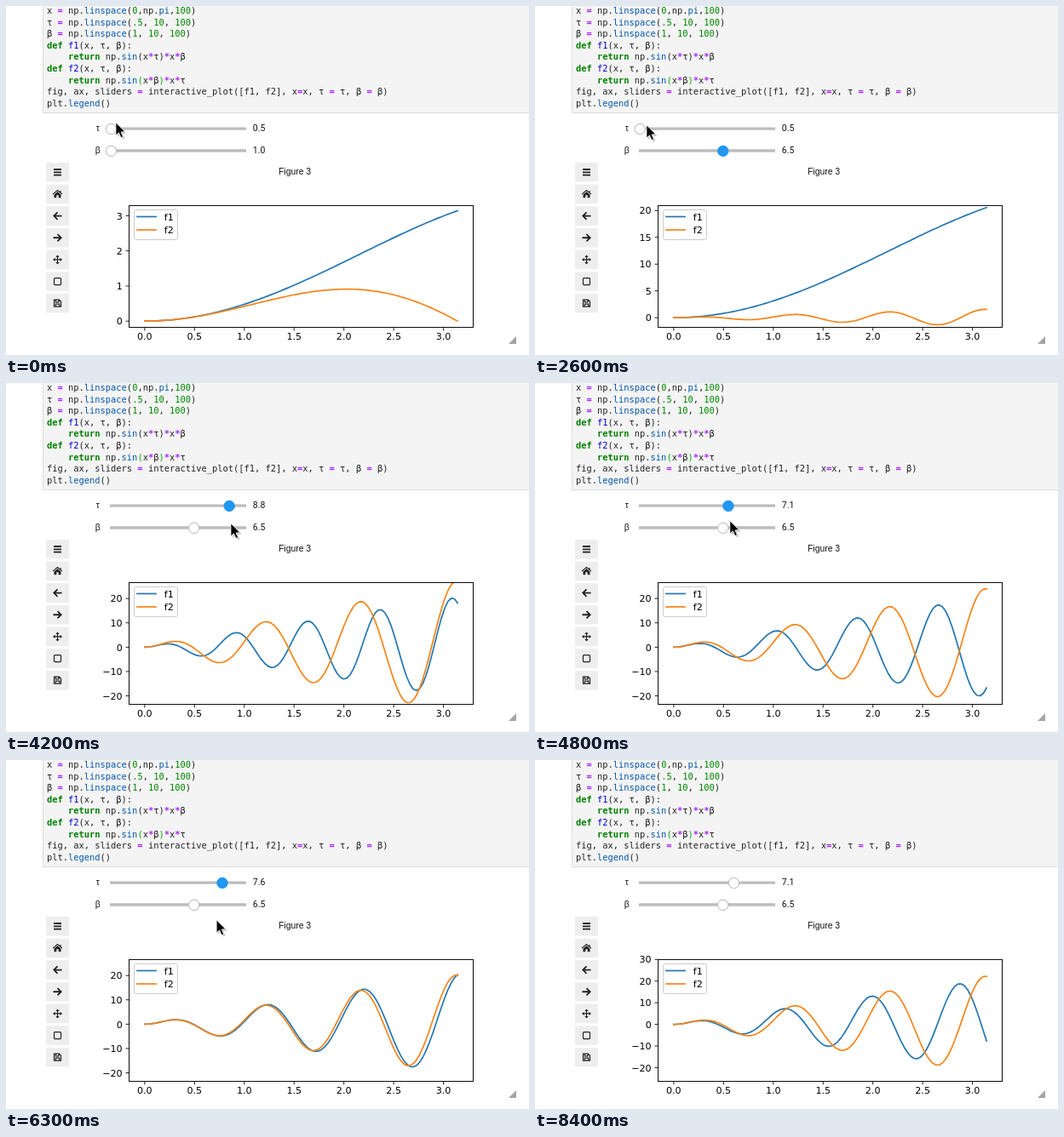
These frames come from a looping animation (614x410 px, 8.6 s). An HTML page:

```html
<!DOCTYPE html>
<html lang="en">
<head>
<meta charset="utf-8">
<title>Interactive plot</title>
<style>
  html, body { margin: 0; width: 100%; height: 100%; overflow: hidden; background: #fff; }
  svg { display: block; }
  text { white-space: pre; }
  .code { font: 10.4px "DejaVu Sans Mono", monospace; fill: #222; }
  .kw { fill: #008000; font-weight: bold; }
  .op { fill: #a2f; font-weight: bold; }
  .prop { fill: #05a; }
  .def { fill: #00c; }
  .num { fill: #080; }
  .match { fill: #0a0; }
  .ui { font: 10.4px "Liberation Sans", Arial, sans-serif; fill: #111; }
  .value { font-family: Roboto, sans-serif; }
  .plot { font: 11.1px "DejaVu Sans", sans-serif; fill: #000; }
  .icon { fill: none; stroke: #222; stroke-width: 1.8; }
  .thin { stroke-width: 1.2; }
  .curve { fill: none; stroke-width: 1.7; stroke-linejoin: round; stroke-linecap: square; }
  .one { stroke: #2376b0; }
  .two { stroke: #f78418; }
  .tick { stroke: #000; stroke-width: .89; }
</style>
</head>
<body>
<svg width="614" height="410" viewBox="0 0 614 410">
  <defs>
    <clipPath id="clip"><rect x="144.5" y="234.5" width="404" height="143"/></clipPath>
    <path id="arrow" d="M0 0V15L3.5 11.8L6 17.6L8.4 16.6L6 11L10.6 10.6Z"/>
  </defs>
  <rect x="43.5" y="-5" width="600" height="130.5" fill="#f4f4f4" stroke="#dcdcdc"/>
  <g id="code" class="code"></g>
  <g id="sliders" class="ui"></g>
  <text class="ui" x="320" y="198">Figure 3</text>
  <g id="buttons"></g>
  <g class="plot">
    <g id="xticks"></g>
    <g id="yticks"></g>
    <g clip-path="url(#clip)">
      <path id="f1" class="curve one"/>
      <path id="f2" class="curve two"/>
    </g>
    <rect x="144.5" y="234.5" width="404" height="143" fill="none" stroke="#000" stroke-width=".95"/>
    <g id="legend">
      <rect x=".5" y="239.5" width="51" height="35" rx="2.2" fill="#fff" fill-opacity=".8" stroke="#ccc"/>
      <path class="curve one" d="M4 247.5h22"/>
      <path class="curve two" d="M4 263h22"/>
      <text x="35.8" y="251.8">f1</text>
      <text x="35.8" y="267.2">f2</text>
    </g>
  </g>
  <path d="M599 388V397H590Z" fill="#a4a4a4"/>
  <g id="cursor">
    <use href="#arrow" x="2" y="2" opacity=".22"/>
    <use href="#arrow" stroke="#fff" stroke-width=".7"/>
  </g>
</svg>
<script>
const LOOP = 8600, STEP = 100;
const LABEL_LAG = 48, CURVE_LAG = 130;
const BOX = { x: 144.5, y: 234, w: 404, h: 142.7 };
const TRACK = { x: 123.3, w: 158 };
const $ = id => document.getElementById(id);

const smooth = k => (1 - Math.cos(Math.PI * k)) / 2;
const easeOut = k => Math.sin(Math.PI / 2 * k);
const easeIn = k => k ** 2.5;

// Each move is [begin, end, goal, easing] and starts where the last one stopped.
function follow(start, moves, t) {
  let now = start;
  for (const [t0, t1, goal, ease = smooth] of moves) {
    if (t <= t0) break;
    const k = ease(Math.min(1, (t - t0) / (t1 - t0)));
    now = now.map((v, i) => v + (goal[i] - v) * k);
  }
  return now;
}

const TAU = {
  name: "τ", nameX: 105.8, y: 144.5, min: .5, active: [2800, 8400],
  moves: [[2900, 4200, [8.85]], [4200, 5200, [1.25], easeIn],
    [5200, 6330, [8.85], easeIn], [6330, 7000, [7.12]]]
};
const BETA = {
  name: "β", nameX: 104.8, y: 170.4, min: 1, active: [1100, 2900],
  moves: [[1395, 2200, [6.55], easeOut]]
};
const SLIDERS = [TAU, BETA];

const cursorAt = t => follow([129, 137], [
  [0, 400, [139, 132]], [400, 800, [130, 164]],
  [1400, 1600, [165, 190], easeOut], [1600, 2200, [225, 191], easeOut],
  [2200, 2600, [131, 140]], [2900, 4200, [264, 165]],
  [4200, 5200, [138, 154], easeIn], [5200, 6350, [260, 192], easeIn],
  [6350, 7100, [237, 152]], [7100, 7700, [117, 41]], [7700, 8050, [80, 0]]
], t);

const limitsAt = t => follow([-.157, 3.299], [
  [1500, 1600, [-1.34, 5.63]], [1600, 2300, [-1.67, 21], easeOut],
  [3100, 3300, [-22, 21]], [3300, 4100, [-23.2, 26.7]], [6400, 6500, [-26, 30.1]]
], t);

const rawValue = (s, t) => follow([s.min], s.moves, t)[0];

// Slider values snap to 100 evenly spaced entries.
function valueAt(s, t) {
  const span = 10 - s.min;
  return s.min + span * Math.round((rawValue(s, t) - s.min) / span * 99) / 99;
}

function drawCode() {
  const lines = [
    "x = np.linspace(0,np.pi,100)", "τ = np.linspace(.5, 10, 100)", "β = np.linspace(1, 10, 100)",
    "def f1(x, τ, β):", "    return np.sin(x*τ)*x*β", "def f2(x, τ, β):", "    return np.sin(x*β)*x*τ",
    "fig, ax, sliders = interactive_plot([f1, f2], x=x, τ = τ, β = β)", "plt.legend()"
  ];
  const token = /(?<kw>\b(?:def|return)\b)|(?<def>(?<=def )\w+)|(?<prop>(?<=\.)[a-z]\w*)|(?<num>(?<!\w)\.?\d+)|(?<op>[=*])|(?<match>\((?=x\*β)|(?<=x\*β)\))/g;
  const paint = (m, ...rest) => {
    const groups = rest[rest.length - 1];
    const kind = Object.keys(groups).find(k => groups[k] !== undefined);
    return `<tspan class="${kind}">${m}</tspan>`;
  };
  $("code").innerHTML = lines.map((line, i) =>
    `<text x="48" y="${Math.round(9 + 13.6 * i)}" xml:space="preserve">${line.replace(token, paint)}</text>`).join("");
}

function drawSliders() {
  $("sliders").innerHTML = SLIDERS.map(s => `
    <text x="${s.nameX}" y="${s.y + 2.7}">${s.name}</text>
    <rect x="122" y="${s.y - 2.1}" width="160" height="3.4" rx=".5" fill="#bdbdbd"/>
    <circle cy="${s.y}" r="6.2"/>
    <text class="value" x="289.8" y="${s.y + 2.8}"></text>`).join("");
  const knobs = $("sliders").querySelectorAll("circle");
  const values = $("sliders").querySelectorAll(".value");
  SLIDERS.forEach((s, i) => { s.knob = knobs[i]; s.label = values[i]; });
}

function drawButtons() {
  const icons = [
    `<path class="icon" d="M-4.5-3.3H4.5M-4.5 0H4.5M-4.5 3.3H4.5"/>`,
    `<path d="M-4 .5L0-2.8L4 .5V4.3H1.2V1.4H-1.2V4.3H-4Z" fill="#222"/>
     <path class="icon thin" d="M-5.5 .2L0-4.3L5.5 .2M3.5-4V-1.5"/>`,
    `<path class="icon" d="M5 0H-4M0-4.2L-4.2 0L0 4.2"/>`,
    `<path class="icon" d="M-5 0H4M0-4.2L4.2 0L0 4.2"/>`,
    `<path class="icon thin" d="M0-4.5V4.5M-4.5 0H4.5"/>
     <path d="M0-5.5L2.2-3H-2.2ZM0 5.5L2.2 3H-2.2ZM-5.5 0L-3-2.2V2.2ZM5.5 0L3-2.2V2.2Z" fill="#222"/>`,
    `<rect class="icon thin" x="-4" y="-4" width="8" height="8" rx="1"/>`,
    `<path class="icon thin" d="M-4-4H2L4-2V4H-4ZM-2.2-4V-1.3H1.5V-4M-2.2 4V1H2.2V4"/>`
  ];
  $("buttons").innerHTML = icons.map((icon, i) => {
    const y = 195.3 + 25.65 * i;
    return `<rect x="47" y="${y - 11.3}" width="27" height="22.6" rx="1" fill="#eee"/>
      <g transform="translate(60.5 ${y})">${icon}</g>`;
  }).join("");
}

const toX = x => BOX.x + BOX.w * (.05 + x / Math.PI) / 1.1;

function drawXTicks() {
  let out = "";
  for (let v = 0; v <= 3; v += .5) {
    const x = toX(v);
    out += `<path class="tick" d="M${x} 377.5v3.9"/><text x="${x}" y="392.3" text-anchor="middle">${v.toFixed(1)}</text>`;
  }
  $("xticks").innerHTML = out;
}

function drawYTicks(lo, hi, toY) {
  const step = [1, 2, 2.5, 5, 10].find(s => (hi - lo) / s <= 6);
  let out = "";
  for (let n = Math.ceil(lo / step); n * step <= hi; n++) {
    const v = n * step, y = toY(v);
    const label = v.toFixed(step === 2.5 ? 1 : 0).replace("-", "−");
    out += `<path class="tick" d="M144.5 ${y}h-3.9"/><text x="136.7" y="${y + 4.2}" text-anchor="end">${label}</text>`;
  }
  $("yticks").innerHTML = out;
}

function drawPlot(t) {
  const [tau, beta] = SLIDERS.map(s => valueAt(s, t - CURVE_LAG));
  const [lo, hi] = limitsAt(t);
  const toY = v => BOX.y + BOX.h * (hi - v) / (hi - lo);
  drawYTicks(lo, hi, toY);

  const curves = {
    f1: x => Math.sin(x * tau) * x * beta,
    f2: x => Math.sin(x * beta) * x * tau
  };
  let blocked = false;
  for (const id in curves) {
    const pts = Array.from({ length: 100 }, (_, i) => {
      const x = Math.PI * i / 99;
      return [toX(x), toY(curves[id](x))];
    });
    blocked = blocked || pts.some(([x, y]) => x > 491 && y > 239 && y < 275);
    $(id).setAttribute("d", "M" + pts.map(p => p.map(n => n.toFixed(2)).join(" ")).join("L"));
  }
  // The legend prefers the upper right corner when no curve crosses it.
  $("legend").setAttribute("transform", `translate(${blocked ? 150 : 491} 0)`);
}

function render(t) {
  for (const s of SLIDERS) {
    const on = t >= s.active[0] && t < s.active[1];
    s.knob.setAttribute("cx", TRACK.x + TRACK.w * (rawValue(s, t) - s.min) / (10 - s.min));
    s.knob.setAttribute("fill", on ? "#2196f3" : "#fff");
    s.knob.setAttribute("stroke", on ? "#2196f3" : "#b5b5b5");
    s.label.textContent = valueAt(s, t - LABEL_LAG).toFixed(1);
  }
  drawPlot(t);
  $("cursor").setAttribute("transform", `translate(${cursorAt(t).join(" ")})`);
  $("cursor").setAttribute("visibility", t < 8100 ? "visible" : "hidden");
}

drawCode();
drawSliders();
drawButtons();
drawXTicks();

const start = performance.now();
let shown = -1;
function tick() {
  const t = Math.floor((performance.now() - start) % LOOP / STEP) * STEP;
  if (t !== shown) render(shown = t);
  requestAnimationFrame(tick);
}
tick();
</script>
</body>
</html>
```
